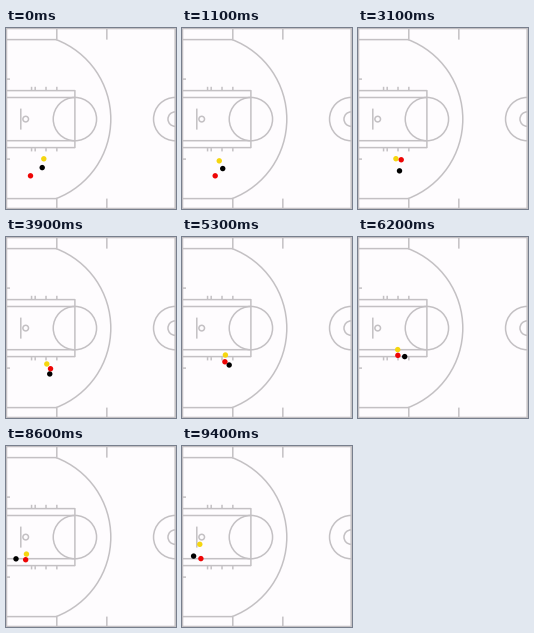
Write a matplotlib script that moves like this. It is 170 by 181 pixels and loops after 9500 ms.

```python
import numpy as np
import matplotlib.pyplot as plt
from matplotlib.animation import FuncAnimation
from matplotlib.patches import Arc, Circle

W, H, DPI = 170, 181, 100
FRAMES, STEP_MS = 95, 100
PAPER, LINE = "#fefcfe", "#c3c0c3"
LINE_PX, DOT_R = 1.5, 2.7
FOOT = 3.61
MID = 91.1
LW = LINE_PX * 72 / DPI

fig = plt.figure(figsize=(W / DPI, H / DPI), dpi=DPI, facecolor=PAPER)
ax = fig.add_axes([0, 0, 1, 1])
ax.set_xlim(0, W)
ax.set_ylim(H, 0)
ax.axis("off")


def line(x0, y0, x1, y1):
    ax.plot([x0, x1], [y0, y1], color=LINE, lw=LW,
            solid_capstyle="butt", snap=False)


def ring(x, y, r):
    ax.add_patch(Circle((x, y), r, fill=False, ec=LINE, lw=LW))


def mirrored(x0, d0, x1, d1):
    """Draw a line above and below the court's long axis."""
    for side in (-1, 1):
        line(x0, MID + side * d0, x1, MID + side * d1)


def draw_court():
    hoop, foul, half = 19.7, 68.9, W - 0.8
    left, top, bottom = 0.5, 0.5, H - 0.5

    # boundary
    for y in (top, bottom):
        line(0, y, W, y)
    for x in (left, half):
        line(x, 0, x, H)

    # lane with its block marks
    mirrored(0, 28.5, foul, 28.5)
    mirrored(0, 21.6, foul, 21.6)
    line(foul, MID - 29, foul, MID + 29)
    for feet in (7, 8, 11, 14):
        mirrored(feet * FOOT + 0.3, 29, feet * FOOT + 0.3, 32.3)
    ring(foul, MID, 6 * FOOT)

    # basket
    line(14.8, MID - 10.5, 14.8, MID + 10.5)
    ring(hoop, MID, 2.8)

    # three-point line
    radius, depth, corner = 85.1, 79.5, 50.8
    mirrored(0, depth, corner, depth)
    angle = np.degrees(np.arcsin(depth / radius))
    ax.add_patch(Arc((hoop, MID), 2 * radius, 2 * radius,
                     theta1=-angle, theta2=angle, ec=LINE, lw=LW))

    # sideline and baseline marks
    for x in (corner, corner + 14 * FOOT - 0.5):
        mirrored(x, depth, x, H / 2)
    mirrored(0, 40, 4, 40)

    # centre circles
    for feet in (2, 6):
        ring(half, MID, feet * FOOT)


def glide(*points):
    """Pass smoothly through points spaced evenly over the loop."""
    p = np.array(points)
    slope = np.gradient(p, axis=0)
    s = np.linspace(0, len(p) - 1, FRAMES)
    i = np.minimum(s.astype(int), len(p) - 2)
    u = (s - i)[:, None]
    ease = u * u * (3 - 2 * u)
    return (p[i] + ease * (p[i + 1] - p[i])
            + u * (1 - u) ** 2 * slope[i]
            - u * u * (1 - u) * slope[i + 1])


yellow = glide((37.8, 130.8), (37.3, 132.8), (36.3, 132.6), (38, 130.6),
               (41.7, 125.4), (43.5, 118.5), (39.3, 112.3), (30.7, 109.4),
               (21.7, 110), (17.8, 98.3))
black = glide((36.2, 139.6), (40.7, 140.6), (38.5, 138.8), (41.6, 142.8),
              (44.5, 134.6), (47.1, 128.6), (46.2, 119.1), (29.7, 113.6),
              (11.2, 113.4), (11.6, 110.1))
red = glide((24.5, 147.8), (32.8, 148.2), (39.3, 135), (43.3, 131.7),
            (44.6, 131.3), (43.1, 125.3), (39.5, 118), (31.5, 114.6),
            (20.7, 114), (18.9, 112.6))

draw_court()
dots = []
for path, color in ((yellow, "#f5d60f"), (black, "#000000"), (red, "#ee0505")):
    dot = Circle(path[0], DOT_R, fc=color, lw=0, zorder=5 + len(dots))
    ax.add_patch(dot)
    dots.append((dot, path))


def update(frame):
    for dot, path in dots:
        dot.center = path[frame]
    return [dot for dot, _ in dots]


anim = FuncAnimation(fig, update, frames=FRAMES, interval=STEP_MS,
                     repeat=True, repeat_delay=0)
plt.show()
```
